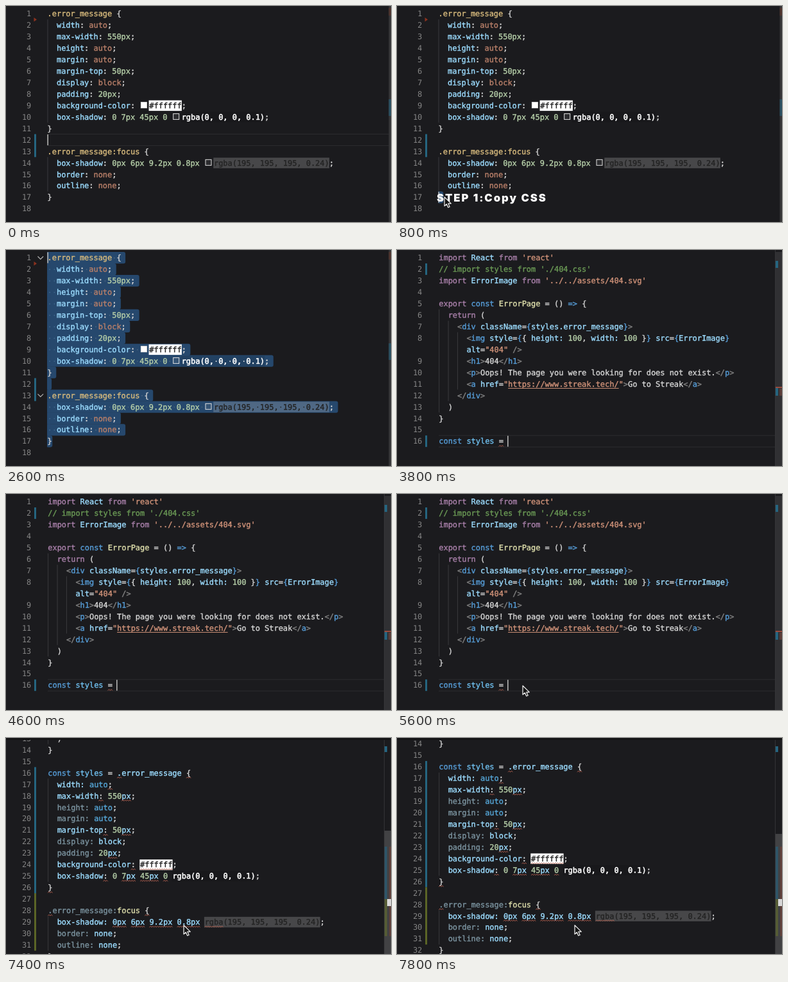
Animation of 600 by 338 pixels, one loop 8000 ms. Source, as an HTML page:

```html
<!DOCTYPE html>
<html lang="en">
<head>
<meta charset="utf-8">
<title>Copy CSS</title>
<style>
  html, body { margin: 0; width: 100%; height: 100%; overflow: hidden; background: #1b1b1e; }
  svg { display: block; width: 100vw; height: 100vh; }
  text { font: 11.94px "DejaVu Sans Mono", monospace; text-rendering: geometricPrecision; }
  .caption { font: 900 16.6px Inter, sans-serif; letter-spacing: 2px; }
</style>
</head>
<body>
<svg id="stage" viewBox="0 0 600 338"></svg>
<script>
const LOOP = 8000, STEP = 200;
const LEFT = 65.3, CHAR = 7.188, ROW = 17.95;
const BLUE = '#256580', OLIVE = '#5b6526';
const COLORS = {
  w: '#d4d4d4', p: '#9cdcfe', y: '#d7ba7d', o: '#b87f69', n: '#b5cea8',
  c: '#6a9955', m: '#a77fa8', u: '#569cd6', v: '#6ebdec', f: '#dcdcaa',
  s: '#ce9178', g: '#808080', d: '#7b939f', a: '#55a5d6',
  k: '#222222', b: '#ffffff', h: '#232323', l: '#ce9178'
};
const BACKS = { k: '#ffffff', b: 'rgba(0,0,0,.1)', h: 'rgba(195,195,195,.26)' };

// "~x" switches to colour x; ~S and ~q insert a colour swatch
const cssLines = [
  '~y.error_message~w {',
  '~p  width~w: ~oauto~w;',
  '~p  max-width~w: ~n550px~w;',
  '~p  height~w: ~oauto~w;',
  '~p  margin~w: ~oauto~w;',
  '~p  margin-top~w: ~n50px~w;',
  '~p  display~w: ~oblock~w;',
  '~p  padding~w: ~n20px~w;',
  '~p  background-color~w: ~S~k#ffffff~w;',
  '~p  box-shadow~w: ~n0 7px 45px 0 ~q~brgba(0, 0, 0, 0.1)~w;',
  '~w}',
  '',
  '~y.error_message:focus~w {',
  '~p  box-shadow~w: ~n0px 6px 9.2px 0.8px ~q~hrgba(195, 195, 195, 0.24)~w;',
  '~p  border~w: ~onone~w;',
  '~p  outline~w: ~onone~w;',
  '~w}',
  ''
];
const jsLines = [
  "~mimport ~pReact ~mfrom ~s'react'",
  "~c// import styles from './404.css'",
  "~mimport ~pErrorImage ~mfrom ~s'../../assets/404.svg'",
  '',
  '~mexport ~uconst ~fErrorPage ~w= () ~u=> ~w{',
  '~m  return ~w(',
  '~g    <~udiv ~pclassName~w=~u{~pstyles.error_message~u}~g>',
  '~g      <~uimg ~pstyle~w=~u{~w{ ~pheight: ~n100~w, ~pwidth: ~n100 ~w}~u} ~psrc~w=~u{~pErrorImage~u}',
  '~p      alt~w=~s"404" ~g/>',
  '~g      <~uh1~g>~w404~g</~uh1~g>',
  '~g      <~up~g>~wOops! The page you were looking for does not exist.~g</~up~g>',
  '~g      <~ua ~phref~w=~s"~lhttps://www.streak.tech/~s"~g>~wGo to Streak~g</~ua~g>',
  '~g    </~udiv~g>',
  '~w  )',
  '~w}',
  '',
  '~uconst ~vstyles ~w= '
];
const pastedLines = [
  ...jsLines.slice(0, 16),
  '~uconst ~vstyles ~w= ~p.error_message ~w{',
  '~p  width: ~aauto~w;',
  '~p  max-width~w: ~n550~ppx~w;',
  '~d  height: ~aauto~w;',
  '~d  margin: ~aauto~w;',
  '~p  margin-top~w: ~n50~ppx~w;',
  '~d  display: ~pblock~w;',
  '~d  padding: ~n20~ppx~w;',
  '~p  background-color~w: ~k#ffffff~w;',
  '~p  box-shadow~w: ~n0 7~ppx ~n45~ppx ~n0 ~brgba(0, 0, 0, 0.1)~w;',
  '~w}',
  '',
  '~d.error_message:~ffocus ~w{',
  '~p  box-shadow: 0px 6px 9.2px 0.8px ~hrgba(195, 195, 195, 0.24)~w;',
  '~d  border: ~pnone~w;',
  '~d  outline: ~pnone~w;',
  '~w}'
];
// row: pairs of column and length
const errors = {
  16: [15, 1, 30, 1], 17: [13, 1], 18: [11, 1, 16, 2], 21: [12, 1, 16, 2], 23: [13, 2],
  24: [18, 1, 20, 7], 25: [12, 1, 16, 3, 20, 4, 25, 1], 26: [0, 1], 28: [0, 1, 21, 1],
  29: [14, 3, 18, 3, 22, 5, 28, 5, 34, 4]
};

const stage = document.getElementById('stage');
const midY = row => 12 + ROW * row;
const topY = row => midY(row) - ROW / 2;
const colX = col => LEFT + CHAR * col;

function add(parent, tag, attrs = {}, text) {
  const el = document.createElementNS('http://www.w3.org/2000/svg', tag);
  for (const k in attrs) el.setAttribute(k, attrs[k]);
  if (text) el.textContent = text;
  return parent.appendChild(el);
}
const group = (parent, attrs) => add(parent, 'g', attrs);
const box = (parent, x, y, width, height, fill, rx = 0) =>
  add(parent, 'rect', { x, y, width, height, fill, rx });
const line = (parent, d, stroke, width = 1) =>
  add(parent, 'path', { d, stroke, 'stroke-width': width, fill: 'none' });
const show = (el, on) => el.setAttribute('display', on ? 'inline' : 'none');

function drawLine(parent, src, row, dots) {
  const y = midY(row);
  let x = LEFT;
  for (const part of src.split('~').slice(1)) {
    const key = part[0], str = part.slice(1), width = str.length * CHAR;
    if (key === 'S' || key === 'q') {
      const fill = key === 'S' ? '#fff' : 'rgba(195,195,195,.1)';
      box(parent, x + 2, y - 5, 9, 9, fill).setAttribute('stroke', '#e0e0e0');
      x += 15;
      continue;
    }
    if (BACKS[key]) box(parent, x - .8, y - 8, width + 1, 16.5, BACKS[key]);
    const lead = str.length - str.trimStart().length;
    add(parent, 'text', {
      x: x + lead * CHAR, y: y + 4.2, fill: COLORS[key], stroke: COLORS[key],
      'stroke-width': key === 'b' ? .55 : .38
    }, str.trim());
    if (key === 'l') line(parent, `M${x} ${y + 7}h${width}`, COLORS.l);
    if (dots) [...str].forEach((ch, i) => {
      if (ch === ' ') add(dots, 'circle', {
        cx: x + (i + .5) * CHAR, cy: y + .5, r: .9, fill: COLORS[key],
        opacity: 'bh'.includes(key) ? 1 : .22
      });
    });
    x += width;
  }
  return x;
}

function drawNumbers(parent, count, wraps) {
  for (let r = 0; r < count; r++) {
    if (wraps && r === 8) continue;
    add(parent, 'text', { x: 39.3, y: midY(r) + 4.2, fill: '#858585', 'text-anchor': 'end' },
      String(wraps && r > 8 ? r : r + 1));
  }
}
const guide = (parent, col, from, to) =>
  line(parent, `M${colX(col) + .4} ${topY(from)}V${topY(to + 1)}`, '#3b3b3e');
const gitBar = (parent, from, to, fill) =>
  box(parent, 44, topY(from), 3, topY(to + 1) - topY(from), fill);
const caretAt = (parent, x, row) => box(parent, x, topY(row) + .5, 1.6, 17, '#b5b5b3');
const currentLine = (parent, row, right) =>
  line(parent, `M65 ${topY(row)}H${right}M65 ${topY(row + 1)}H${right}`, '#2d2d30');

function squiggle(parent, row, col, len) {
  const d = `M${colX(col)} ${midY(row) + 8.3}` + 'l1.8 -1.8l1.8 1.8'.repeat(len * 2);
  line(parent, d, '#b5604f');
}

box(stage, 0, 0, 600, 338, '#1b1b1e');

// stylesheet view
const css = group(stage);
const code = group(css, { transform: 'translate(-.7 0)' });
const current = group(code);
currentLine(current, 11, 598);
guide(code, 0, 1, 9);
guide(code, 0, 13, 15);
const selection = group(code);
const rows = cssLines.map((src, r) => {
  const back = group(selection);
  const dots = group(code);
  const end = drawLine(code, src, r, dots);
  const width = end - LEFT + (r === 16 ? 1 : 7);
  box(back, LEFT - .5, topY(r), width, ROW + .3, '#26486d', 3);
  box(back, LEFT - .5, topY(r), 5, ROW + .3, '#26486d');
  code.appendChild(dots);
  return { back, dots };
});
drawNumbers(css, 18);
gitBar(css, 11, 12, BLUE);
add(css, 'path', { d: 'M43.5 18l4.5 3.3-4.5 3.3z', fill: '#8c321f' });
const folds = group(css);
for (const r of [0, 12]) line(folds, `M49.5 ${midY(r) - 2}l4.3 4.3 4.3-4.3`, '#b4b4b4', 1.2);
const cssCaret = caretAt(css, 64.4, 0);
box(css, 596.5, 0, 3.5, 338, '#353537');
box(css, 596.5, 3, 3.5, 12, '#4d332d');
box(css, 596.5, 146, 3.5, 26, '#2a4f60');

// script view, before and after the paste
function scriptView(lines, guides) {
  const view = group(stage);
  const body = group(view);
  for (const g of guides) guide(body, ...g);
  lines.forEach((src, r) => drawLine(body, src, r));
  drawNumbers(body, lines.length, true);
  gitBar(body, 1, 1, BLUE);
  line(view, 'M589.5 0V338', '#343437');
  return { view, body };
}
const inner = [[0, 5, 13], [2, 6, 12], [4, 7, 11]];
const js = scriptView(jsLines, inner);
currentLine(js.body, 16, 589);
gitBar(js.body, 16, 16, BLUE);
squiggle(js.body, 16, 13, 1);
caretAt(js.body, 172, 16);
box(js.view, 590, 3, 10, 335, '#303033');
box(js.view, 590, 17, 4, 11, BLUE);
box(js.view, 590, 216, 4, 12, BLUE);
box(js.view, 590, 214, 10, 2, '#9a4b3d');
box(js.view, 596, 217, 4, 11, '#5a3d38');

const pasted = scriptView(pastedLines, [...inner, [0, 17, 25], [0, 29, 31]]);
gitBar(pasted.body, 16, 26, BLUE);
gitBar(pasted.body, 27, 31, OLIVE);
for (const r in errors)
  for (let i = 0; i < errors[r].length; i += 2) squiggle(pasted.body, +r, errors[r][i], errors[r][i + 1]);
box(pasted.view, 0, 0, 600, 3, '#131315');
box(pasted.view, 590, 13, 4, 9, BLUE);
const thumb = box(pasted.view, 590, 140, 10, 200, '#424244');
box(pasted.view, 590, 170, 4, 82, '#2f5568');
box(pasted.view, 590, 252, 4, 58, '#555c35');
box(pasted.view, 597, 170, 3, 140, '#5f403a');
box(pasted.view, 594, 252, 6, 11, '#d8d8d8');

const caption = add(stage, 'text', { class: 'caption', x: 62, y: 305.8, fill: '#fff' }, 'STEP 1:Copy CSS');
const mouse = add(stage, 'path', {
  d: 'M0 0v14l3.3-3 2.4 5.3 2.4-1-2.3-5.2h4.5z',
  fill: '#151515', stroke: '#f2f2f2', 'stroke-width': 1.2, 'stroke-linejoin': 'round'
});

// keys are [time, value, ...]
function track(keys, t) {
  let i = 0;
  while (i < keys.length - 2 && t >= keys[i + 1][0]) i++;
  const [a, b] = [keys[i], keys[i + 1]];
  const k = Math.min(1, Math.max(0, (t - a[0]) / (b[0] - a[0])));
  return a.slice(1).map((v, j) => v + (b[j + 1] - v) * k);
}
const dragPath = [[400, 112, 324], [800, 74, 299], [1000, 66, 232], [1200, 50, 112], [1400, 14, 32], [1800, 14, 6], [2400, 13, 4]];
const pointPath = [[5000, 262, 248], [5600, 196, 300], [6000, 196, 300], [6600, 277, 293], [7800, 277, 293]];
const topRows = [[800, 16], [1000, 12], [1200, 6], [1400, 2], [1800, 0], [2400, 0]];

function render(t) {
  const inCss = t < 3800, isPasted = t >= 6000, selecting = t >= 800;
  show(css, inCss);
  show(js.view, !inCss && !isPasted);
  show(pasted.view, isPasted);

  const top = Math.round(track(topRows, t)[0]);
  rows.forEach((row, r) => {
    const on = selecting && r >= top && r <= 16;
    show(row.back, on);
    show(row.dots, on);
  });
  show(current, !selecting);
  folds.setAttribute('opacity', track([[1200, 0], [1600, 1]], t)[0]);
  cssCaret.setAttribute('y', topY(selecting ? top : 11) + .5);

  const scroll = track([[7200, 235.2], [7600, 254.2]], t)[0];
  pasted.body.setAttribute('transform', `translate(0 ${-scroll})`);
  thumb.setAttribute('y', 140 + (scroll - 235.2) * .53);

  show(caption, t >= 400 && t < 2200);
  const dragging = t >= 400 && t < 2600;
  show(mouse, dragging || t >= 5000);
  mouse.setAttribute('transform', `translate(${track(dragging ? dragPath : pointPath, t)})`);
}

const start = performance.now();
function tick() {
  const t = (performance.now() - start) % LOOP;
  render(Math.floor(t / STEP) * STEP);
  requestAnimationFrame(tick);
}
tick();
</script>
</body>
</html>
```
